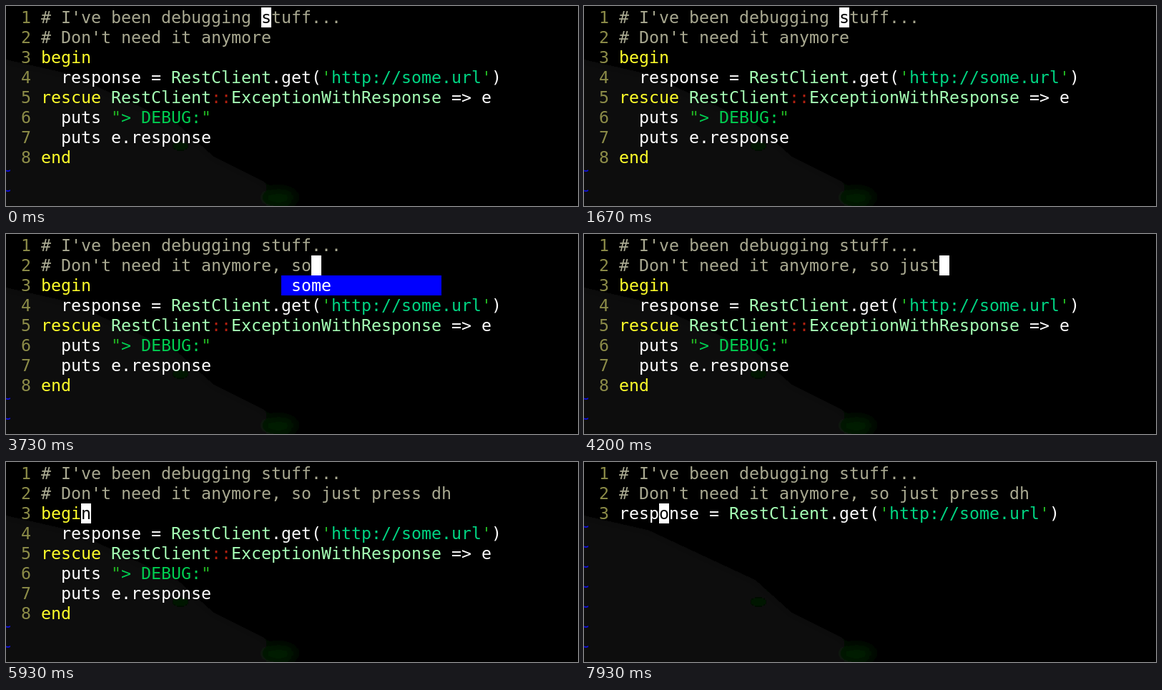
An HTML page for the animation above (7.99 s loop, 800 px wide and 280 px high).

```html
<!DOCTYPE html>
<html lang="en">
<head>
<meta charset="utf-8">
<title>Editor session</title>
<style>
  html, body { margin: 0; width: 100%; height: 100%; overflow: hidden; background: #000; }
  #stage {
    position: relative; width: 800px; height: 280px; overflow: hidden;
    background: #000; color: #fff;
    font: 23.254px/28px "DejaVu Sans Mono", "Noto Sans Mono", monospace;
    font-variant-ligatures: none; font-kerning: none;
  }
  #stage svg { position: absolute; inset: 0; }
  .row, .num, .tilde, #cursor, #popup { position: absolute; height: 28px; white-space: pre; }
  .row { left: 49px; }
  .num { left: 21px; color: #8c8c48; }
  .tilde { left: -7px; margin-top: -10px; color: #1010d8; }
  .c { color: #a8a890; }
  .k { color: #ffff2a; }
  .t { color: #a4ffb4; }
  .s { color: #00d482; }
  .d { color: #00cc50; }
  .q { color: #22b422; }
  .r { color: #b02010; }
  #cursor { width: 14px; background: #fff; color: #000; }
  #popup { left: 385px; top: 58px; width: 224px; background: #00f; }
</style>
</head>
<body>
<div id="stage">
  <svg width="800" height="280">
    <defs>
      <filter id="soft" x="-50%" y="-50%" width="200%" height="200%"><feGaussianBlur stdDeviation="7"/></filter>
    </defs>
    <g filter="url(#soft)">
      <path d="M-20 70 L90 95 L240 165 L290 210 L360 245 L410 300 L-20 300Z" fill="#080808"/>
      <ellipse cx="244" cy="196" rx="14" ry="7" fill="#021402"/>
      <ellipse cx="382" cy="268" rx="24" ry="12" fill="#021a02"/>
    </g>
  </svg>
  <div id="text"></div>
  <div id="popup"> some</div>
  <div id="cursor"></div>
</div>
<script>
const LOOP = 7990, CELL = 14, LINE = 28, LEFT = 49, TOP = 2, ROWS = 10;
const text = document.getElementById('text');
const popup = document.getElementById('popup');
const cursor = document.getElementById('cursor');

const tag = (cls, str) => `<span class="${cls}">${str}</span>`;
const request = 'response = ' + tag('t', 'RestClient') + '.get(' +
  tag('q', "'") + tag('s', 'http://some.url') + tag('q', "'") + ')';
const comments = [
  tag('c', "# I've been debugging stuff..."),
  tag('c', "# Don't need it anymore<span class='tail'></span>")
];
const wrapped = [
  ...comments,
  tag('k', 'begin'),
  '  ' + request,
  tag('k', 'rescue') + ' ' + tag('t', 'RestClient') + tag('r', '::') +
    tag('t', 'ExceptionWithResponse') + ' =&gt; e',
  '  puts ' + tag('q', '"') + tag('d', '&gt; DEBUG:') + tag('q', '"'),
  '  puts e.response',
  tag('k', 'end')
];
const unwrapped = [...comments, request];

function addPage(lines) {
  const page = document.createElement('div');
  const cell = (cls, row, html) =>
    `<div class="${cls}" style="top:${TOP + row * LINE}px">${html}</div>`;
  for (let i = 0; i < ROWS; i++) {
    page.innerHTML += i < lines.length
      ? cell('num', i, i + 1) + cell('row', i, lines[i])
      : cell('tilde', i, '~');
  }
  return text.appendChild(page);
}
const before = addPage(wrapped), after = addPage(unwrapped);
const tails = document.querySelectorAll('.tail');

// Typed text and the moment each key lands
const typed = ', so just press dh';
const keys = [2930, 3130, 3330, 3530];
for (let i = 0; i < 10; i++) keys.push(3800 + i * 96.5);
keys.push(4800, 4930, 5130, 5330);

// [time, row, column, letter under the cursor]
const moves = [
  [0, 0, 22, 's'],
  [1870, 1, 22, 'e'],
  [2800, 1, 23, ''],
  [5530, 1, 40, 'h'],
  [5870, 2, 4, 'n'],
  [6670, 2, 4, 'o']
];

function draw(t) {
  const count = keys.filter(k => k <= t).length;
  const [start, row, col, letter] = moves.filter(m => m[0] <= t).pop();
  const x = col + (start === 2800 ? count : 0);

  tails.forEach(el => { el.textContent = typed.slice(0, count); });
  cursor.style.left = LEFT + x * CELL + 'px';
  cursor.style.top = TOP + row * LINE + 'px';
  cursor.textContent = letter;
  popup.hidden = t < 3600 || t >= 3800;
  before.hidden = t >= 6670;
  after.hidden = t < 6670;
}

const origin = performance.now();
function tick() {
  draw((performance.now() - origin) % LOOP);
  requestAnimationFrame(tick);
}
tick();
</script>
</body>
</html>
```
